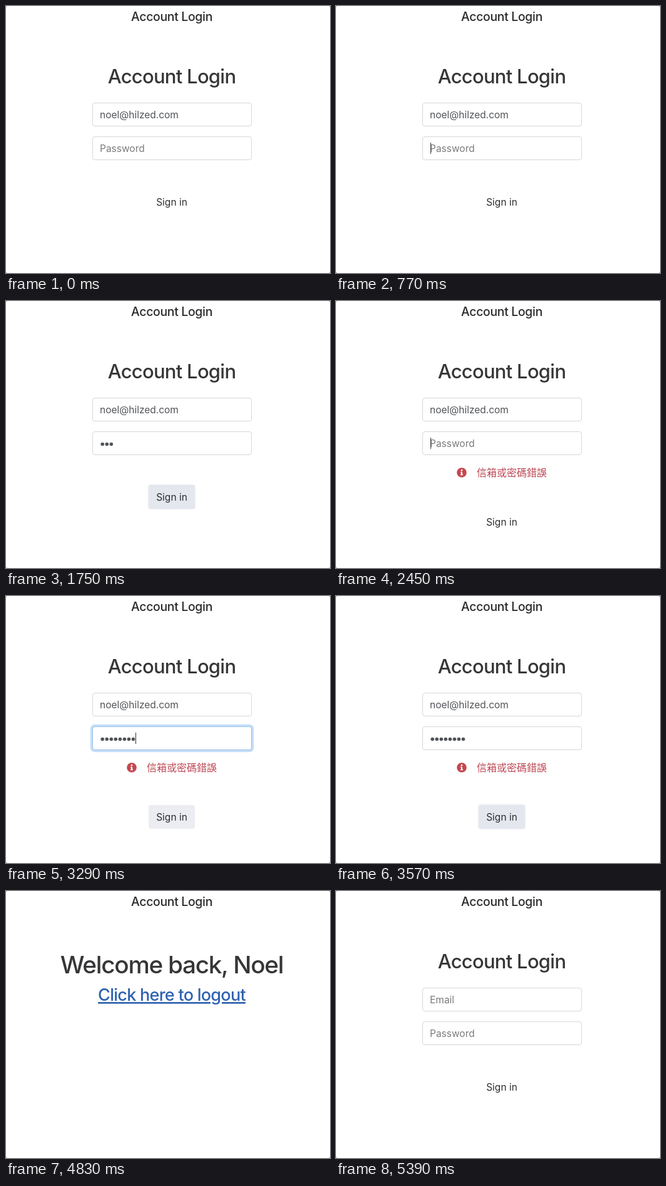
Recreate the animation shown at these times as an HTML page. Size 518 by 428 pixels, loop 6.3 s.

```html
<!DOCTYPE html>
<html lang="en">
<head>
<meta charset="utf-8">
<title>Account Login</title>
<style>
  html, body { margin: 0; width: 100%; height: 100%; overflow: hidden; background: #777; }
  svg { display: block; width: 518px; height: 428px; }
  text { font: 400 15.5px Inter, "Open Sans", sans-serif; font-optical-sizing: none; fill: #505357; }
  .center { text-anchor: middle; }
  .heading { font-weight: 500; fill: #363638; }
  #bar { font-size: 19.4px; letter-spacing: -.016em; fill: #2b2b2d; }
  #login { font-size: 31px; letter-spacing: -.024em; }
  #welcome { font-size: 38.7px; letter-spacing: -.033em; }
  #logout { font-size: 27px; letter-spacing: -.027em; }
  .placeholder { fill: #7a7b7d; }
  .field { fill: #fff; stroke: #d5d7da; }
  #signIn text { fill: #2b2d30; }
  #error text { font: 16px "Noto Sans CJK TC", "Noto Sans CJK JP", sans-serif; fill: #bd4853; }
</style>
</head>
<body>
<svg viewBox="0 0 518 428">
  <rect width="518" height="428" rx="2" fill="#fff"/>
  <text id="bar" class="center heading" x="265" y="24">Account Login</text>

  <g id="form">
    <text id="login" class="center heading" x="265" y="124.3">Account Login</text>
    <rect class="field" x="138.5" y="155.5" width="254" height="37" rx="3.5"/>
    <text id="email" x="150" y="180"></text>

    <rect class="field" x="138.5" y="209.5" width="254" height="37" rx="3.5"/>
    <g id="ring">
      <rect x="134.8" y="205.8" width="261.4" height="44.4" rx="7" fill="#c5def8"/>
      <rect x="138.5" y="209.5" width="254" height="37" rx="3.5" fill="#fff" stroke="#95c0ec"/>
    </g>
    <text id="hint" class="placeholder" x="150" y="234">Password</text>
    <g id="dots" fill="#505357"></g>
    <rect id="caret" y="219" width="1" height="18" fill="#333"/>

    <g id="error">
      <circle cx="201" cy="275" r="7.8" fill="#c5474f"/>
      <circle cx="201" cy="271.3" r="1.4" fill="#fff"/>
      <path d="M199 273.7h3v3.9h1v1.6h-4v-1.6h1v-2.3h-1z" fill="#fff"/>
      <text x="225" y="281">信箱或密碼錯誤</text>
    </g>

    <g id="signIn">
      <rect id="hover" x="228" y="295" width="74" height="38" rx="4" fill="#ecedf2"/>
      <g id="pressed">
        <rect x="226.6" y="293.6" width="76.8" height="40.8" rx="5" fill="#f0f2f5"/>
        <rect x="228" y="295" width="74" height="38" rx="4" fill="#e4e7ee"/>
      </g>
      <text class="center" x="265" y="320">Sign in</text>
    </g>
  </g>

  <g id="account">
    <text id="welcome" class="center heading" x="265" y="132">Welcome back, Noel</text>
    <text id="logout" class="center heading" x="265" y="176">Click here to logout</text>
  </g>
</svg>
<script>
const LOOP = 6300, STEP = 70, FADE = 140, DOT_PITCH = 7.04;
const el = id => document.getElementById(id);
const show = (id, on) => { el(id).style.display = on ? '' : 'none'; };
const within = (t, from, to) => t >= from && t < to;
const ramp = (t, start) => Math.min(1, Math.max(0, (t - start) / FADE));
const pulse = (t, from, to) => ramp(t, from) - ramp(t, to);
const mix = (a, b, p) => `rgb(${a.map((v, i) => Math.round(v + (b[i] - v) * p))})`;

const dots = Array.from({ length: 8 }, (_, i) => {
  const dot = document.createElementNS('http://www.w3.org/2000/svg', 'circle');
  dot.setAttribute('cx', 154.2 + i * DOT_PITCH);
  dot.setAttribute('cy', 229.5);
  dot.setAttribute('r', 2.8);
  el('dots').append(dot);
  return dot;
});

function typedLength(t) {
  if (within(t, 1330, 1890)) return t < 1470 ? 1 : t < 1540 ? 2 : 3;
  return within(t, 3010, 3920) ? 8 : 0;
}

function draw(t) {
  const loggedIn = within(t, 3920, 5390);
  const failed = within(t, 1890, 3920);
  const typed = typedLength(t);
  show('form', !loggedIn);
  show('account', loggedIn);
  show('error', failed);

  el('email').textContent = t < 3920 ? 'noel@hilzed.com' : 'Email';
  el('email').setAttribute('class', t < 3920 ? '' : 'placeholder');

  el('ring').style.opacity = pulse(t, 770, 1610) + pulse(t, 2450, 3430);
  show('hint', !typed);
  dots.forEach((dot, i) => { dot.style.display = i < typed ? '' : 'none'; });
  show('caret', within(t, 770, 1260) || within(t, 1330, 1680) || within(t, 2450, 3500));
  el('caret').setAttribute('x', 151 + Math.round(typed * DOT_PITCH));

  el('signIn').setAttribute('transform', `translate(0 ${failed ? 40 : 0})`);
  show('hover', within(t, 1540, 1890) || within(t, 3290, 3920));
  show('pressed', within(t, 1610, 1890) || within(t, 3430, 3920));
  el('pressed').style.opacity = t < 1890 ? ramp(t, 1610) : ramp(t, 3430);

  const hovered = ramp(t, 4340);
  el('logout').style.fill = mix([64, 143, 226], [46, 98, 176], hovered);
  el('logout').style.textDecoration = hovered ? 'underline' : 'none';
}

function tick() {
  const t = performance.now() % LOOP;
  draw(Math.floor(t / STEP) * STEP);
  requestAnimationFrame(tick);
}
tick();
</script>
</body>
</html>
```
